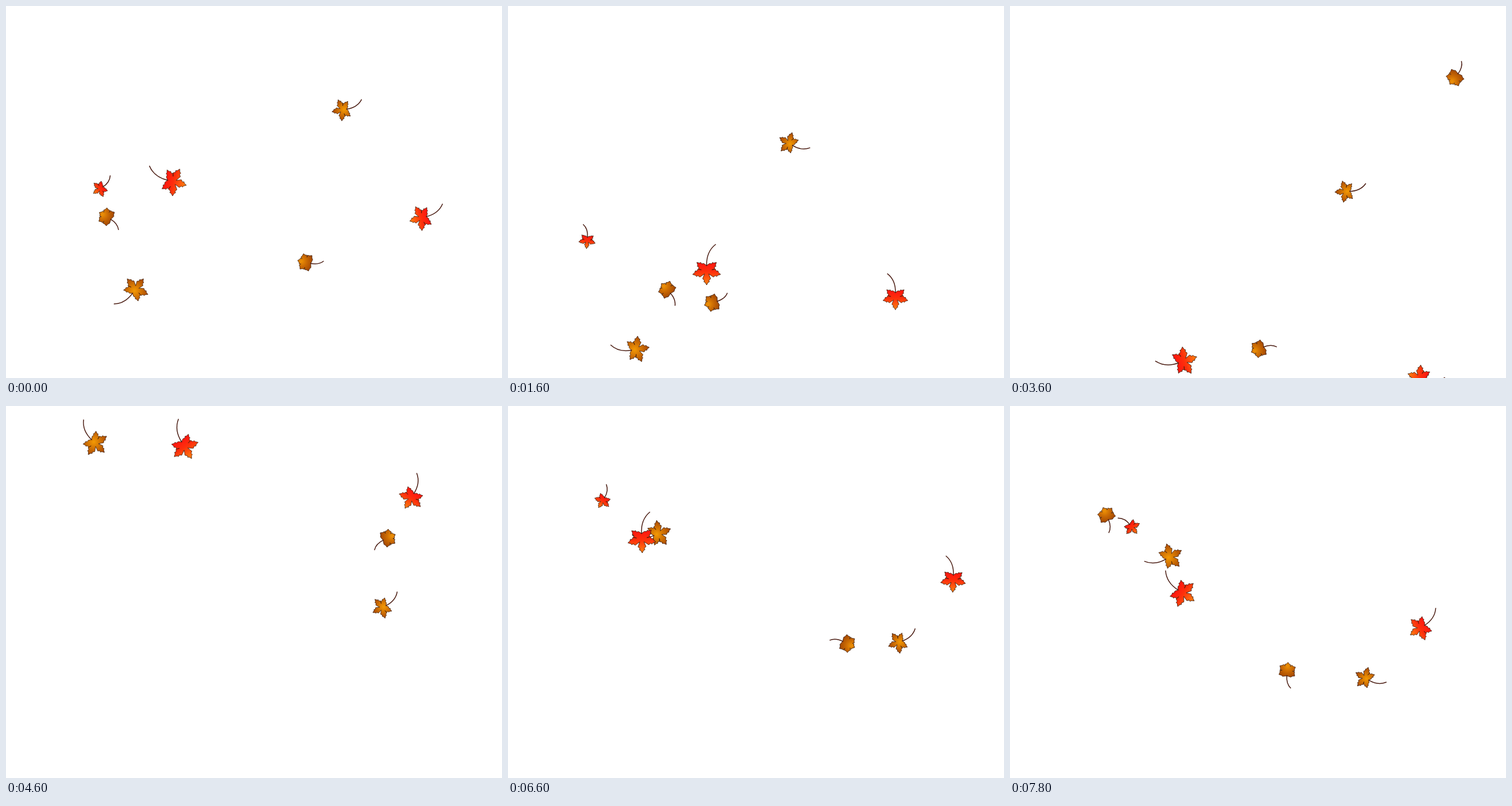
Animation, 864 px wide and 648 px high, one loop 8 s. Source, as an HTML page:

```html
<!DOCTYPE html>
<html lang="en">
<head>
<meta charset="utf-8">
<title>Falling leaves</title>
<style>
  html, body { margin: 0; width: 100%; height: 100%; overflow: hidden; background: #fff; }
  svg { display: block; width: 864px; height: 648px; }
  .blade, .stem { vector-effect: non-scaling-stroke; }
  .blade { stroke: #3c1c0c; stroke-width: .8; stroke-linejoin: round; }
  .stem { fill: none; stroke: #4a1c12; stroke-width: 1.5; }
</style>
</head>
<body>
<svg id="stage" viewBox="0 0 864 648">
  <defs>
    <linearGradient id="red" gradientUnits="userSpaceOnUse" x1="0" y1="-14" x2="0" y2="24">
      <stop offset="0" stop-color="#ff1610"/>
      <stop offset=".4" stop-color="#fd300c"/>
      <stop offset="1" stop-color="#ff8410"/>
    </linearGradient>
    <radialGradient id="brown" gradientUnits="userSpaceOnUse" cx="0" cy="-4" r="25">
      <stop offset="0" stop-color="#f39a04"/>
      <stop offset=".4" stop-color="#d87a04"/>
      <stop offset="1" stop-color="#ac4c02"/>
    </radialGradient>
    <radialGradient id="round" gradientUnits="userSpaceOnUse" cx="0" cy="8" r="20">
      <stop offset="0" stop-color="#ee9206"/>
      <stop offset=".45" stop-color="#cc6c04"/>
      <stop offset="1" stop-color="#a44802"/>
    </radialGradient>
  </defs>
</svg>
<script>
const LOOP = 8000, STEP = 200, BEND = 19;
const stage = document.getElementById('stage');

// Point at a distance along a direction (degrees from the leaf tip) and across it.
function polar(deg, along, across = 0) {
  const a = deg * Math.PI / 180, s = Math.sin(a), c = Math.cos(a);
  return [along * s + across * c, along * c - across * s];
}

// Lobes run from the tip round to the stem; every lobe carries the same teeth on both sides.
function blade(lobes, teeth, notch) {
  const right = [];
  lobes.forEach(([deg, len], i) => {
    const tooth = sign => ([along, across]) => polar(deg, along * len, sign * across * len);
    if (i) right.push(...teeth.map(tooth(-1)));
    right.push(polar(deg, len), ...teeth.slice().reverse().map(tooth(1)));
    const next = lobes[i + 1];
    const gap = next ? (deg + next[0]) / 2 : 180;
    right.push(polar(gap, notch(gap)));
  });
  const left = right.slice(1, -1).reverse().map(([x, y]) => [-x, y]);
  return right.concat(left).join(' ');
}

const maple = {
  points: blade([[0, 24], [77, 25], [132, 23]], [[.55, .29], [.66, .16], [.77, .2], [.82, .1]],
    gap => Math.min(10, 4 + gap / 20)),
  stem: 'M0,-9Q-1,-34 16,-47'
};
const stubby = {
  points: blade([[0, 14.5], [62, 15.5], [120, 16]], [[.72, .36], [.8, .18]], () => 9),
  stem: 'M0,-8Q0,-23 9,-30'
};
const shapes = { red: maple, brown: maple, round: stubby };

// Key points: time into the fall, offset across and down, direction of the stem end.
const sway = [[0, 9, -66, -40], [800, 0, 0, -12], [1800, -74, 60, 58], [2800, -78, 161, 17],
  [3800, -20, 235, -56], [4000, -10, 255, -37], [5400, 35, 391, 19], [6600, 9, 485, -46]];
const drift = [[0, 0, 0, -61], [1600, 126, 75, -102], [4600, -90, 221, -43], [5600, -157, 232, -27],
  [6600, -122, 300, -50], [7800, -42, 380, -101]];
const glide = [[0, 0, 0, -8], [600, 6, 70, -26], [1600, 50, 180, -65], [3800, 139, 282, -100]];
glide.splice(3, 0, [2600, 121, 239, -93]);
const sink = [[0, 0, 0, -124], [1600, -2, 113, -80]];

// A tumbling leaf turns at a steady rate in degrees per second.
const tumble = (angle, rate, points) => points.map(p => [...p, angle - rate * p[0] / 1000]);
const spin = tumble(-19, 206.5, [[0, 0, 0], [1000, 110, 105], [3000, 184, 289], [4200, 292, 336],
  [5400, 419, 392], [6600, 493, 465]]);
const roll = tumble(140, 215, [[0, 0, 0], [1600, 102, 127], [2800, 196, 189]]);
const enter = tumble(381, 206, [[0, 0, 0], [400, 26, 36], [1000, 16, 78]]);

// side mirrors a leaf together with its path; size scales both.
const fall = (kind, size, side, path, x, y, start, life) => ({ kind, size, side, path, x, y, start, life });
const falls = [
  fall('brown', .77, -1, drift, 586, 181, 0, LOOP),
  fall('brown', .93, 1, sink, 226, 493, 0, 2400),
  fall('brown', .93, 1, glide, 150, 0, 4000, 4000),
  fall('round', 1, -1, spin, 775, 125, -3800, 7200),
  fall('round', 1, -1, spin, 775, 125, 3600, 7200),
  fall('round', 1, 1, roll, 175, 367, 0, 4200),
  fall('round', 1, 1, enter, 152, 112, 6800, 1200),
  fall('red', .59, -1, sway, 158, 168, -4000, 7400),
  fall('red', .59, -1, sway, 165, 165, 5800, 7400),
  fall('red', .89, -1, sway, 706, 160, -3800, 7400),
  fall('red', .89, -1, sway, 706, 160, 3800, 7400),
  fall('red', 1, 1, sway, 311, 71, -3800, 7400),
  fall('red', 1, 1, sway, 311, 71, 3800, 7400)
];

function add(parent, tag, attrs) {
  const el = document.createElementNS('http://www.w3.org/2000/svg', tag);
  for (const k in attrs) el.setAttribute(k, attrs[k]);
  return parent.appendChild(el);
}

for (const leaf of falls) {
  const { points, stem } = shapes[leaf.kind];
  leaf.el = add(stage, 'g', {});
  add(leaf.el, 'polygon', { class: 'blade', points, fill: `url(#${leaf.kind})` });
  add(leaf.el, 'path', { class: 'stem', d: stem });
}

function slope(path, i, c) {
  const rate = j => (path[j + 1][c] - path[j][c]) / (path[j + 1][0] - path[j][0]);
  if (i === 0) return rate(0);
  if (i === path.length - 1) return rate(i - 1);
  const a = path[i][0] - path[i - 1][0], b = path[i + 1][0] - path[i][0];
  return (rate(i - 1) * b + rate(i) * a) / (a + b);
}

// Smooth curve through the key points, carried straight on after the last.
function pose(path, t) {
  const end = path.length - 1;
  if (t >= path[end][0])
    return [1, 2, 3].map(c => path[end][c] + slope(path, end, c) * (t - path[end][0]));
  const i = path.findIndex(p => p[0] > t) - 1;
  const p = path[i], q = path[i + 1], d = q[0] - p[0];
  const u = (t - p[0]) / d, v = 1 - u;
  return [1, 2, 3].map(c =>
    p[c] * v * v * (1 + 2 * u) + q[c] * u * u * (3 - 2 * u) +
    d * u * v * (slope(path, i, c) * v - slope(path, i + 1, c) * u));
}

function draw(t) {
  for (const { el, size, side, path, x, y, start, life } of falls) {
    const age = t - start, shown = age >= 0 && age <= life;
    el.style.display = shown ? '' : 'none';
    if (!shown) continue;
    const [dx, dy, angle] = pose(path, age), flip = size * side;
    el.setAttribute('transform',
      `translate(${x + flip * dx} ${y + size * dy}) rotate(${side * (angle - BEND)}) scale(${flip} ${size})`);
  }
}

const begin = performance.now();
function tick() {
  const t = (performance.now() - begin) % LOOP;
  draw(Math.floor(t / STEP) * STEP);
  requestAnimationFrame(tick);
}
draw(0);
requestAnimationFrame(tick);
</script>
</body>
</html>
```
